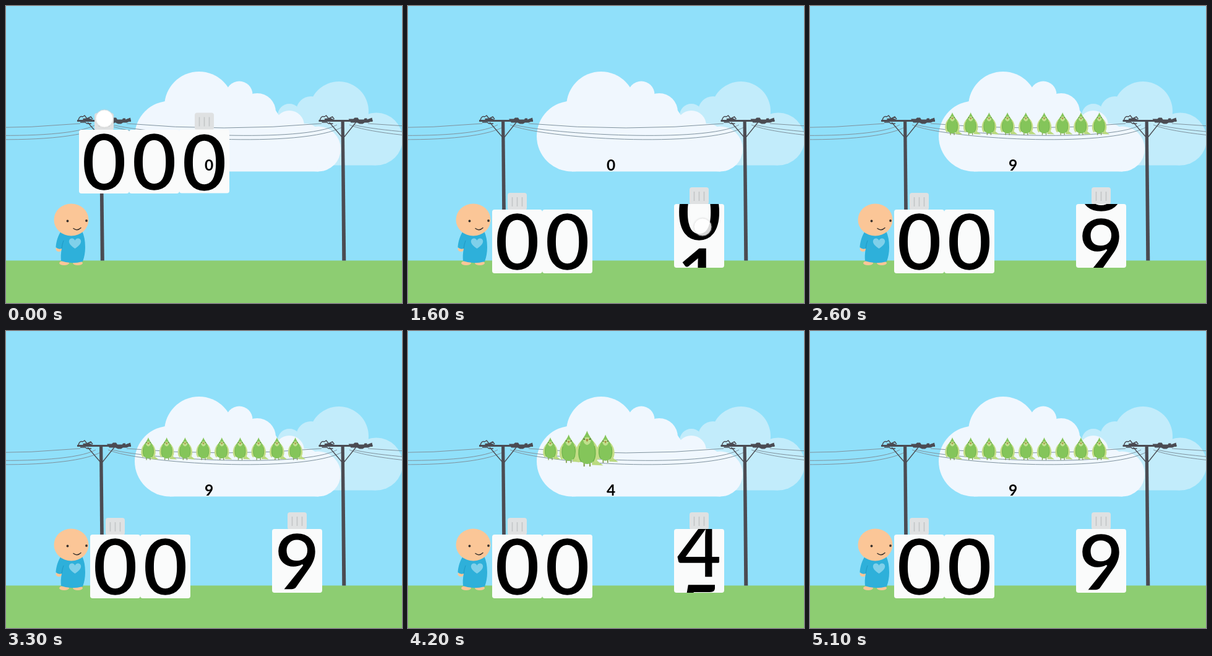
An HTML page that plays this animation: 640x480 px, repeating every 5.6 s.

```html
<!DOCTYPE html>
<html lang="en">
<head>
<meta charset="utf-8">
<title>Counting birds</title>
<style>
html, body { margin: 0; width: 100%; height: 100%; overflow: hidden; background: #90e0fa; }
svg { display: block; width: 100vw; height: 100vh; }
text { font-family: Lato, sans-serif; font-weight: 700; text-anchor: middle; fill: #000; }
/* the card-coloured outline thins the heavy strokes */
.big { font-size: 127px; stroke: #fafbfb; stroke-width: 2.4px; }
.small { font-size: 24.5px; }
</style>
</head>
<body>
<svg viewBox="0 0 640 480">
  <defs>
    <clipPath id="face"><rect width="81" height="103" rx="4"/></clipPath>
    <rect id="card" width="81" height="103" rx="4" fill="#fafbfb"/>
    <g id="tab">
      <rect x="25" y="-27" width="31" height="28" rx="4" fill="#dfe1e2"/>
      <path d="M32.5 -20v15M40.5 -20v15M48.5 -20v15" stroke="#c3c5c7" stroke-width="1.6"/>
    </g>
    <g id="pole" stroke="#4b4b52" fill="#4b4b52">
      <path d="M151 184h5.2l2.6 227.5h-6z" stroke="none"/>
      <path d="M115 185.5H202" stroke-width="3"/>
      <path d="M132 188L153.5 213M175 188L155 213" fill="none" stroke-width="1.3"/>
      <path d="M117 184q2 -7 7 -5l3 -2 4 5 6 -3 3 4M120 188h8l3 2h7" fill="none" stroke-width="1.5"/>
      <path d="M163 182.500h8l2 -2h5l2 3h8l1 -2h4v2l8 -3 1 5 -7 3h-6l-3 2h-5l-4 -2h-10z" stroke="none"/>
      <path d="M124 182l10 -1 6 3v3h-14z" stroke="none"/>
    </g>
    <path id="wire" fill="none" stroke="#7f929d" d="M195 190Q352 204 510 190
      M172 192C230 207 480 222 535 192M165 192C215 214 480 231 545 195"/>
    <g id="bird">
      <path d="M5 8L16.5 17 5 16.5Z" fill="#b9da7e"/>
      <path d="M-3 14v4M3 14v4" stroke="#7f9a48" stroke-width="1.3"/>
      <path d="M-5 -9C-12 -4 -14 8 -9 14C-6 13 -3 4 -5 -9ZM5 -9C12 -4 14 8 9 14C6 13 3 4 5 -9Z" fill="#c3dd86"/>
      <path d="M0 -18.5C2 -12 7 -9 7.500 -3C9 2 9 9 6 13Q0 18 -6 13C-9 9 -9 2 -7.500 -3C-7 -9 -2 -12 0 -18.500Z" fill="#84c55a"/>
      <path d="M-7.500 -3C-9 2 -9 9 -6 13M7.500 -3C9 2 9 9 6 13" fill="none" stroke="#6fb44b"/>
      <path d="M-4 -10Q0 -14 4 -10Q4 -5 0 -4Q-4 -5 -4 -10Z" fill="#bfe08c"/>
      <path d="M-1.7 -10h3.4L0 -7Z" fill="#a98a3f"/>
      <circle cx="-3" cy="-10" r=".8" fill="#47662f"/>
      <circle cx="3" cy="-10" r=".8" fill="#47662f"/>
    </g>
  </defs>

  <rect width="640" height="480" fill="#90e0fa"/>
  <g fill="#c2ecfb">
    <circle cx="538" cy="170" r="48"/>
    <circle cx="493" cy="170" r="24"/>
    <circle cx="458" cy="177" r="19"/>
    <circle cx="598.5" cy="215" r="42.5"/>
    <rect x="440" y="176" width="158" height="81.5"/>
  </g>
  <g fill="#f0f7fe">
    <circle cx="265" cy="210.5" r="57"/>
    <circle cx="312" cy="162" r="56"/>
    <circle cx="377" cy="143" r="21.5"/>
    <circle cx="406" cy="171" r="30"/>
    <circle cx="458" cy="193" r="24"/>
    <circle cx="484" cy="217" r="27"/>
    <circle cx="504.5" cy="231" r="36.5"/>
    <path d="M265 160H430L450 190 490 200 505 267.5H265Z"/>
  </g>
  <rect y="411.4" width="640" height="69" fill="#8dcd72"/>

  <use href="#wire" x="-390"/><use href="#wire"/><use href="#wire" x="390"/>
  <use href="#pole"/><use href="#pole" x="390.5"/>

  <g id="kid">
    <ellipse cx="94" cy="415.5" rx="8" ry="3.5" fill="#fbc697"/>
    <ellipse cx="116" cy="415.5" rx="8" ry="3.5" fill="#fbc697"/>
    <ellipse cx="85.5" cy="393" rx="5" ry="4" fill="#fbc697"/>
    <path d="M89 364C84 371 81 381 80.5 390Q85 394 90 392Q88 403 89 412Q105 418 124 413Q128 402 128 390Q128 374 123 364Z" fill="#2eb0da"/>
    <path d="M90 392Q91 384 93 379" fill="none" stroke="#1f98c4"/>
    <path d="M111.5 392C104 387 101 383 102 379C104 374 110 375 111.5 379C113 375 119 374 121 379C122 383 119 387 111.5 392Z" fill="#7fd0ea"/>
    <ellipse cx="105.5" cy="345.5" rx="28" ry="26" fill="#fbc697"/>
    <circle cx="99.5" cy="347.5" r="1.9" fill="#3a322d"/>
    <circle cx="130" cy="347" r="1.9" fill="#3a322d"/>
    <path d="M109 359.5Q115 364.5 121 358.5" fill="none" stroke="#3a322d" stroke-width="1.5" stroke-linecap="round"/>
  </g>

  <g id="birds"></g>
  <g id="pair">
    <use href="#tab"/>
    <use href="#card"/><use href="#card" x="81"/>
    <text class="big" x="40.5" y="98">0</text>
    <text class="big" x="121.5" y="98">0</text>
  </g>
  <g id="single">
    <use href="#tab"/>
    <use href="#card"/>
    <g clip-path="url(#face)"><g id="reel"></g></g>
  </g>
  <text id="label" class="small" x="328" y="265.5">0</text>
  <g id="touch">
    <circle r="16" fill="#ccc" opacity=".2"/>
    <circle r="14" fill="#fff" stroke="#e2e2e2"/>
  </g>
</svg>
<script>
const LOOP = 5600, STEP = 100, PITCH = 103, MAX = 9;
const DRAG = 200, POP = 170;
const $ = id => document.getElementById(id);
const NS = "http://www.w3.org/2000/svg";

function add(parent, tag, attrs) {
  const el = document.createElementNS(NS, tag);
  for (const k in attrs) el.setAttribute(k, attrs[k]);
  return parent.appendChild(el);
}

const birds = [];
for (let i = 0; i <= MAX; i++) {
  add($("reel"), "text", { class: "big", x: 40.5, y: 99 + PITCH * i }).textContent = i;
  if (i < MAX) birds.push(add($("birds"), "use", { href: "#bird" }));
}

// Each swipe drags the reel up by one digit, then lets it glide to 9.
const swipes = [{ start: 1650, glide: 1510 }, { start: 4050, glide: 1250 }];
const fall = { start: 3350, time: 500 };

const clamp = x => Math.max(0, Math.min(1, x));
const smooth = x => x * x * (3 - 2 * x);

function rise(t, s) {
  if (t < s.start) return clamp((t - s.start + DRAG) / DRAG) ** 3.3;
  return MAX - (MAX - 1) * (1 - clamp((t - s.start) / s.glide)) ** 4;
}

function timeAt(v, s) {
  if (v < 1) return s.start - DRAG + DRAG * v ** (1 / 3.3);
  return s.start + s.glide * (1 - ((MAX - v) / (MAX - 1)) ** 0.25);
}

function valueAt(t) {
  if (t < fall.start) return rise(t, swipes[0]);
  const end = fall.start + fall.time;
  if (t < end) return MAX * (1 - smooth((t - fall.start) / fall.time));
  return rise(t, swipes[1]);
}

// Rows are time followed by values, joined by straight segments.
function track(rows, t) {
  let i = 0;
  while (i < rows.length - 2 && t >= rows[i + 1][0]) i++;
  const [a, b] = [rows[i], rows[i + 1]];
  const u = clamp((t - a[0]) / (b[0] - a[0]));
  return a.slice(1).map((x, j) => x + (b[j + 1] - x) * u);
}

const pairPath = [[100, 118, 200], [400, 136, 329]];
const singlePath = [[0, 280, 199.5], [500, 280, 199.5], [600, 278, 199], [900, 430, 320]];
const touchPath = [
  [0, 159, 182, 1], [100, 159, 182, 1], [400, 177, 311, 1], [500, 250, 248, 0],
  [600, 319, 186, 0.9], [900, 471, 307, 0.9], [1000, 471, 307, 0],
  [1300, 476, 397, 0], [1400, 476, 397, 0.8], [1450, 476, 397, 0.85],
  [1600, 476, 357, 0.85], [1700, 476, 285, 0],
  [3300, 476, 345, 0], [3400, 476, 355, 0.85], [3600, 476, 466, 0.85], [3700, 476, 480, 0],
  [3800, 476, 397, 0], [3900, 476, 395, 0.85], [4000, 476, 357, 0.85], [4100, 476, 285, 0]
];

function move(id, [x, y]) {
  $(id).setAttribute("transform", `translate(${x} ${y})`);
}

function birdScale(k, t, v) {
  if (v < k - 0.5) return 0;
  const s = t < fall.start + fall.time ? swipes[0] : swipes[1];
  const age = clamp((t - timeAt(k - 0.5, s)) / POP);
  return 1 + 0.58 * Math.sin(Math.PI * age) ** 2;
}

function draw(t) {
  const v = valueAt(t);
  const finger = track(touchPath, t);
  move("pair", track(pairPath, t));
  move("single", track(singlePath, t));
  move("reel", [0, -PITCH * v]);
  move("touch", finger);
  $("touch").setAttribute("opacity", finger[2]);
  $("label").textContent = Math.round(v);
  birds.forEach((b, i) => {
    const s = birdScale(i + 1, t, v);
    b.setAttribute("visibility", s ? "visible" : "hidden");
    b.setAttribute("transform", `translate(${230 + 29.7 * i} 190.5) scale(${s})`);
  });
}

const begin = performance.now();
function tick() {
  const t = (performance.now() - begin) % LOOP;
  draw(Math.floor(t / STEP) * STEP);
  requestAnimationFrame(tick);
}
tick();
</script>
</body>
</html>
```
